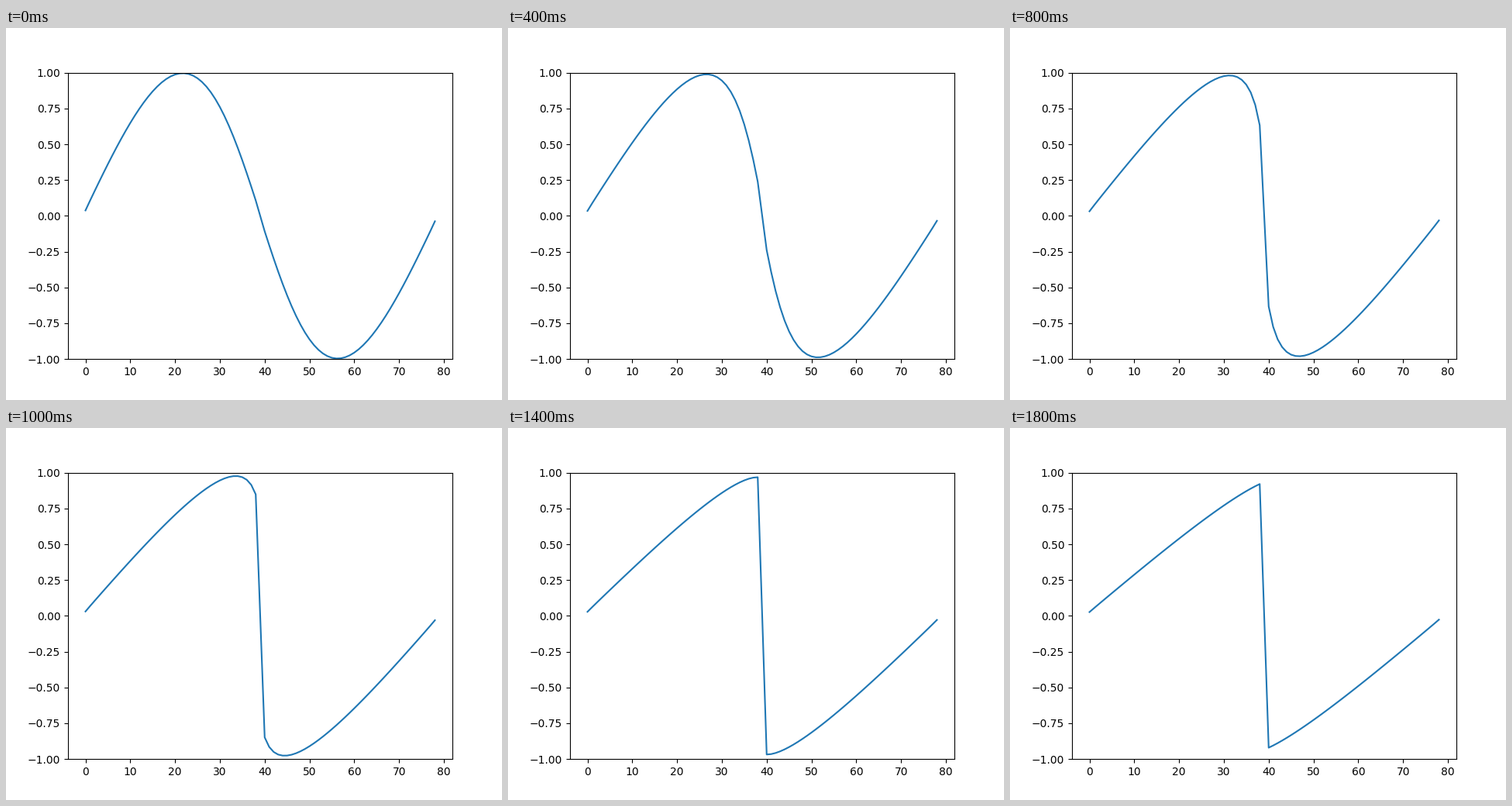
A matplotlib script that plays this animation: 640 px wide and 480 px high, repeating every 2 s.

```python
import numpy as np
import matplotlib.pyplot as plt
from matplotlib.animation import FuncAnimation

CELLS = 79
COURANT = 0.5          # dt / dx
STEPS_PER_FRAME = 5
FRAMES = 10


def godunov_flux(left, right):
    """Exact Riemann flux for the inviscid Burgers equation."""
    return 0.5 * np.maximum(np.maximum(left, 0) ** 2, np.minimum(right, 0) ** 2)


def step(u):
    flux = godunov_flux(u, np.roll(u, -1))
    return u - COURANT * (flux - np.roll(flux, 1))


def solve():
    u = np.sin(2 * np.pi * (np.arange(CELLS) + 0.5) / CELLS)
    states = []
    for _ in range(FRAMES):
        for _ in range(STEPS_PER_FRAME):
            u = step(u)
        states.append(u)
    return states


states = solve()

fig, ax = plt.subplots(figsize=(6.4, 4.8), dpi=100)
line, = ax.plot(states[0], color="#1f77b4", lw=1.5)
ax.set_ylim(-1, 1)


def update(i):
    line.set_ydata(states[i])
    return line,


anim = FuncAnimation(fig, update, frames=FRAMES, interval=200,
                     repeat=True, repeat_delay=0)
plt.show()
```
